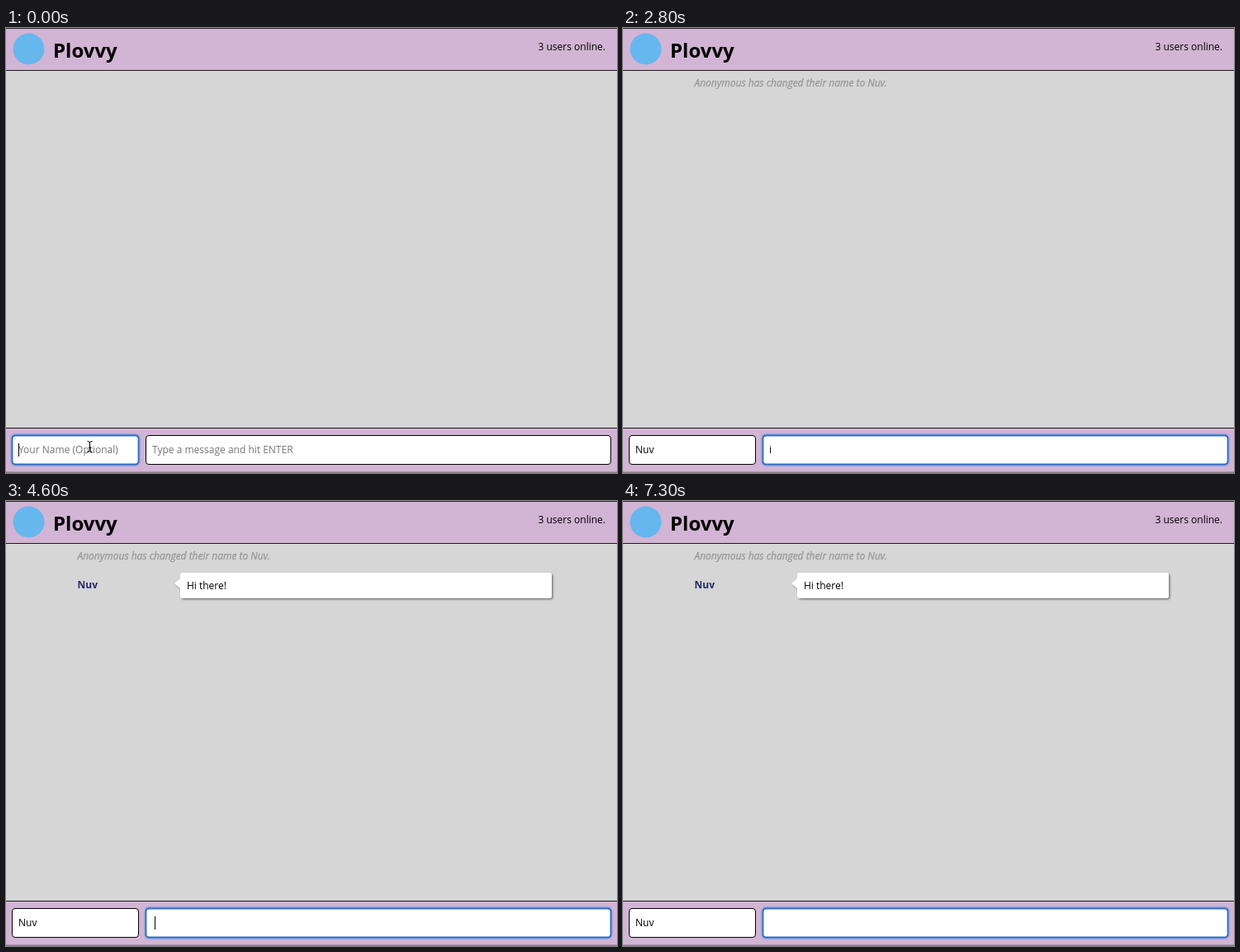
Animation, 740 px wide and 540 px high, one loop 7.4 s. Source, as an HTML page:

```html
<!DOCTYPE html>
<html lang="en">
<head>
<meta charset="utf-8">
<title>Chat room</title>
<style>
html, body { margin: 0; width: 100%; height: 100%; overflow: hidden; background: #d6d6d6; }
svg { display: block; width: 740px; height: 540px; }
text { font: 12px "Open Sans", "Noto Sans", sans-serif; white-space: pre; fill: #000; }
.title { font-size: 24px; font-weight: 700; }
.hint { fill: #757575; }
.notice { font-style: italic; fill: #999; stroke: #999; stroke-width: .3px; }
.author { font-weight: 700; fill: #26296b; }
.box { fill: #fff; stroke: #000; }
.ring { fill: none; stroke: #2f70c6; stroke-width: 1.8px; }
.glow { fill: none; stroke: #5d94dc; stroke-width: 3px; filter: url(#soft); }
</style>
</head>
<body>
<svg viewBox="0 0 740 540">
  <defs>
    <filter id="soft" filterUnits="userSpaceOnUse" x="0" y="484" width="740" height="56">
      <feGaussianBlur stdDeviation="1.2"/>
    </filter>
    <filter id="shade" x="-5%" y="-30%" width="110%" height="170%">
      <feDropShadow dx="1.5" dy="1.5" stdDeviation="1.2" flood-color="#000" flood-opacity=".45"/>
    </filter>
  </defs>

  <rect width="740" height="540" fill="#d6d6d6"/>
  <rect width="740" height="52" fill="#d2b4d4"/>
  <rect width="740" height="1" fill="#2b252b"/>
  <rect y="51" width="740" height="1" fill="#1c181c"/>
  <circle cx="27.5" cy="25.5" r="19" fill="#66b7ee"/>
  <text class="title" x="57" y="35.5">Plovvy</text>
  <text x="726" y="27" text-anchor="end">3 users online.</text>

  <text class="notice" id="notice" x="86.5" y="71">Anonymous has changed their name to Nuv.</text>
  <g id="post">
    <text class="author" x="86.5" y="105.5">Nuv</text>
    <g filter="url(#shade)" fill="#fff">
      <rect x="211" y="87" width="450" height="31" rx="3"/>
      <path d="M212 93.5L204 100L212 106.5Z"/>
    </g>
    <text x="219" y="106.5">Hi there!</text>
  </g>

  <rect y="485" width="740" height="55" fill="#d2b4d4"/>
  <rect y="485" width="740" height="1" fill="#1c181c"/>
  <rect y="538.5" width="740" height="1.5" fill="#8b7b8c"/>
  <g id="fields"></g>
  <rect id="caret" y="504" width="1" height="16"/>
  <path id="beam" d="M98.5 501.5Q101.5 501.5 101.5 503.5Q101.5 501.5 104.5 501.5M101.5 503V513M98.5 514.5Q101.5 514.5 101.5 512.5Q101.5 514.5 104.5 514.5M100 509.5H103" fill="none" stroke="#000"/>
</svg>
<script>
const LOOP = 7400, BLINK = 500;
const TAB = 2000, SEND = 4400;
const $ = id => document.getElementById(id);

// Keystrokes: [time, value after the key]
const nameKeys = [[0, ""], [600, "N"], [800, "Nu"], [1000, "Nuv"]];
const textKeys = [
  [TAB, ""], [2700, "i"], [3000, ""], [3200, "H"], [3300, "Hi"], [3400, "Hi "],
  ...[..."there"].map((c, i) => [3500 + i * 100, "Hi " + "there".slice(0, i + 1)]),
  [4100, "Hi there!"], [SEND, " "]
];

function make(parent, tag, attrs) {
  const el = document.createElementNS("http://www.w3.org/2000/svg", tag);
  for (const k in attrs) el.setAttribute(k, attrs[k]);
  return parent.appendChild(el);
}

function field(x, width, hint, keys) {
  const rect = cls => make($("fields"), "rect",
    { class: cls, x: x + .5, y: 494.5, width: width - 1, height: 35, rx: 3.5 });
  const glow = rect("glow");
  rect("box");
  const ring = rect("ring");
  const text = make($("fields"), "text", { x: x + 8, y: 516 });
  return { x: x + 8, hint, keys, text, focusParts: [glow, ring] };
}

const nameField = field(7, 154, "Your Name (Optional)", nameKeys);
const textField = field(169, 564, "Type a message and hit ENTER", textKeys);

const show = (el, on) => el.setAttribute("visibility", on ? "visible" : "hidden");

function lastKey(keys, t) {
  return keys.filter(k => k[0] <= t).pop() || [0, ""];
}

function drawField(f, t, focused) {
  const [since, value] = lastKey(f.keys, t);
  const label = value || (t >= TAB && focused && since > TAB ? "" : f.hint);
  if (f.text.textContent !== label) f.text.textContent = label;
  f.text.setAttribute("class", value ? "" : "hint");
  f.focusParts.forEach(p => show(p, focused));
  if (!focused) return;
  const width = value ? f.text.getComputedTextLength() : 0;
  $("caret").setAttribute("x", Math.round(f.x + width));
  show($("caret"), value !== "i" && Math.floor((t - since) / BLINK) % 2 === 0);
}

function draw(t) {
  drawField(nameField, t, t < TAB);
  drawField(textField, t, t >= TAB);
  show($("beam"), t < nameKeys[1][0]);
  show($("notice"), t >= TAB);
  show($("post"), t >= SEND);
}

function tick() {
  draw(Math.floor(performance.now() % LOOP / 100) * 100);
  requestAnimationFrame(tick);
}
tick();
</script>
</body>
</html>
```
